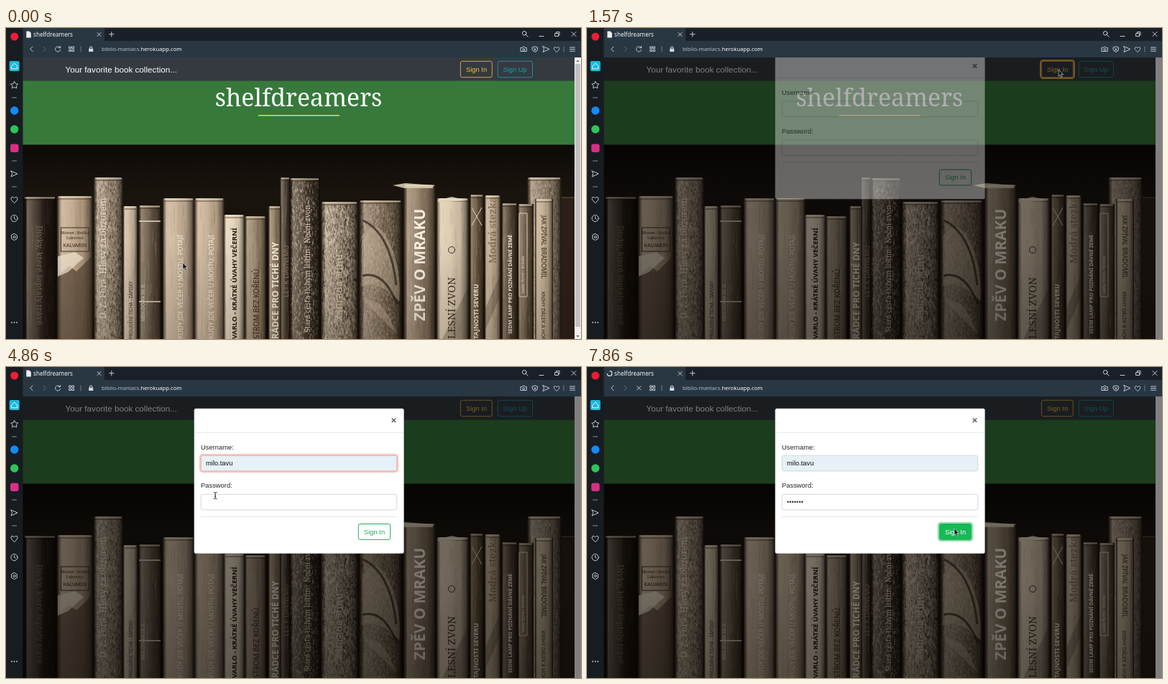
These frames come from a looping animation (800 px wide and 433 px high, 8000 ms). An HTML page:

```html
<!DOCTYPE html>
<html lang="en">
<head>
<meta charset="utf-8">
<title>Book collection</title>
<style>
html, body { margin: 0; width: 100%; height: 100%; overflow: hidden; background: #1a2026; }
svg { display: block; width: 100vw; height: 100vh; }
text { white-space: pre; }
.page { font: 9.37px "Liberation Sans", Arial, sans-serif; }
.ui { font-family: "Noto Sans", "Open Sans", sans-serif; }
.serif { font-family: "Noto Serif", serif; }
.icon { fill: none; stroke: #c3cbd1; stroke-width: 1; stroke-linecap: round; stroke-linejoin: round; }
</style>
</head>
<body>
<svg id="stage" viewBox="0 0 800 433" preserveAspectRatio="none">
  <defs>
    <linearGradient id="spine">
      <stop offset="0" stop-color="#0d0804" stop-opacity=".9"/>
      <stop offset=".07" stop-color="#0d0804" stop-opacity=".2"/>
      <stop offset=".12" stop-color="#fff0d8" stop-opacity=".36"/>
      <stop offset=".45" stop-color="#fff0d8" stop-opacity=".16"/>
      <stop offset=".72" stop-color="#0d0804" stop-opacity=".06"/>
      <stop offset=".9" stop-color="#0d0804" stop-opacity=".42"/>
      <stop offset="1" stop-color="#0d0804" stop-opacity=".92"/>
    </linearGradient>
    <linearGradient id="fall" x2="0" y2="1">
      <stop offset=".5" stop-color="#140d07" stop-opacity="0"/>
      <stop offset="1" stop-color="#140d07" stop-opacity=".2"/>
    </linearGradient>
    <linearGradient id="wall" x2="0" y2="1">
      <stop offset="0" stop-color="#0c0906"/>
      <stop offset=".25" stop-color="#1a140e"/>
      <stop offset="1" stop-color="#0c0805"/>
    </linearGradient>
    <clipPath id="photoClip"><rect x="23" y="162.6" width="768" height="271"/></clipPath>
    <filter id="shadow" x="-20%" y="-20%" width="140%" height="150%">
      <feDropShadow dx="0" dy="1" stdDeviation="1.2" flood-opacity=".4"/>
    </filter>
  </defs>

  <g class="page">
    <rect x="23" y="41" width="777" height="392" fill="#fff"/>
    <rect x="23" y="41" width="768" height="33" fill="#343a40"/>
    <rect x="23" y="73.6" width="768" height="90" fill="#37793b"/>
    <text x="82.5" y="61.5" font-size="11.7" fill="#fff">Your favorite book collection...</text>
    <rect id="navRing" x="631" y="45" width="47" height="25" rx="3.5" fill="none" stroke="#ffbf45" stroke-width="2" opacity=".85"/>
    <rect id="navBtn" x="632.3" y="46.3" width="44" height="22.4" rx="2.5" stroke="#f8bf3d" stroke-width=".8"/>
    <text id="navLabel" x="640" y="60.6">Sign In</text>
    <rect x="684.3" y="46.3" width="48.2" height="22.4" rx="2.5" fill="none" stroke="#17a2b8" stroke-width=".8"/>
    <text x="691.5" y="60.6" fill="#17a2b8">Sign Up</text>
    <text class="serif" x="407" y="109" font-size="33.8" fill="#fff" text-anchor="middle">shelfdreamers</text>
    <path d="M351 121.7h113" stroke="#f0d264" stroke-width="1.6"/>
    <g id="photo" clip-path="url(#photoClip)"></g>
    <g id="scroll">
      <rect x="791" y="41" width="9" height="392" fill="#f1f1f1"/>
      <rect x="792" y="50" width="7" height="366" fill="#c1c1c1"/>
      <path d="M793.5 47l2-2.5 2 2.5zM793.5 428l2 2.5 2-2.5z" fill="#606060"/>
    </g>
    <rect id="dim" x="23" y="41" width="777" height="392" fill="#000"/>

    <g id="modal">
      <rect x="261.7" y="57.7" width="292" height="202" rx="2.5" fill="#fff" stroke="#000" stroke-opacity=".25" stroke-width=".6"/>
      <path d="M262 91.2h291M271 208.5h273" stroke="#dfe3e7" stroke-width=".8"/>
      <path d="M536.8 71.5l5.4 5.4m0-5.4l-5.4 5.4" stroke="#6b6b6b" stroke-width="1.7"/>
      <text x="271" y="114.8" fill="#212529">Username:</text>
      <text x="271" y="168.4" fill="#212529">Password:</text>
      <g id="fields"></g>
      <rect id="sendRing" x="488.7" y="216.8" width="47.6" height="25" rx="3.5" fill="none" stroke="#9be0b1" stroke-width="2.2"/>
      <rect id="sendBtn" x="490.3" y="218.5" width="44.4" height="21.8" rx="2.5" stroke="#1cae58"/>
      <text id="sendLabel" x="498" y="232.6">Sign In</text>
      <g id="list" class="ui" font-size="8.6" font-weight="bold" fill="#1c1c1c">
        <rect x="270.5" y="146" width="112.5" height="72.5" rx="1.5" fill="#fff" stroke="#bbb" stroke-width=".6" filter="url(#shadow)"/>
        <rect id="hover" x="271" y="150" width="111.5" height="21.3" fill="#cfdfe4"/>
        <text x="277.5" y="164">milo.tavu</text>
        <text x="277.5" y="185">toma.bellix</text>
        <text x="277.5" y="206">milotavu</text>
      </g>
    </g>
  </g>

  <g id="chrome" class="ui">
    <rect width="800" height="18" fill="#1a2027"/>
    <rect width="23.5" height="433" fill="#171c21"/>
    <path d="M23.5 41V0H137v18h663v23z" fill="#293743"/>
    <text x="38" y="11.9" font-size="8.1" fill="#f2f4f5">shelfdreamers</text>
    <path class="icon" d="M127 6.5l5 5m0-5l-5 5M143.5 8.7h6.5m-3.2-3.2v6.5M742 11.5h6M787 5.5l6 6m0-6l-6 6M764 7.5h4.5v4h-4.5zM765.5 7V5.5h4.5v4.5h-1M723.3 9.3l3 3"/>
    <circle class="icon" cx="721.2" cy="7.2" r="2.8"/>
    <path id="tabDoc" d="M28.3 4.5h4l2.5 2.5v6.5h-6.5z" fill="#eef1f2"/>
    <path id="spinner" d="M31.5 5.7a3.3 3.3 0 1 1-3.3 3.3" fill="none" stroke="#dfe5e9" stroke-width="1.2"/>
    <path class="icon" d="M37 26l-3.3 3.3 3.3 3.3"/>
    <path class="icon" d="M52 26l3.3 3.3-3.3 3.3" opacity=".35"/>
    <path id="reload" class="icon" d="M75 27.2a3.6 3.6 0 1 0 .7 3.2M75.6 25.4v2.3h-2.3"/>
    <path id="stop" class="icon" d="M69.7 26.7l5.2 5.2m0-5.2l-5.2 5.2"/>
    <path class="icon" d="M88 26h2.4v2.4H88zM92.2 26h2.4v2.4h-2.4zM88 30.2h2.4v2.4H88zM92.2 30.2h2.4v2.4h-2.4z"/>
    <path d="M104 25.5v8M776 25.5v8" stroke="#6f7b84"/>
    <path d="M115.2 28.7h6v4.3h-6zM116 29v-1.4a2.2 2.2 0 0 1 4.4 0V29h-1v-1.3a1.2 1.2 0 0 0-2.4 0V29z" fill="#d2d8dc"/>
    <text x="133" y="32.2" font-size="7.7" fill="#b4bec6">biblio-maniacs.<tspan fill="#fff">herokuapp.com</tspan></text>
    <path class="icon" d="M716.3 27.5h2l1-1.3h2l1 1.3h2v5h-8zM732.3 27l3.6-1.2 3.6 1.2v3q-.6 2.5-3.6 3.4-3-.9-3.6-3.4zM734.5 28.5l2.8 2.8m0-2.8l-2.8 2.8M784.5 27h7m-7 2.6h7m-7 2.6h7"/>
    <circle class="icon" cx="720.3" cy="30" r="1.4"/>
    <g id="side"></g>
  </g>

  <g id="cursor">
    <path id="arrow" d="M0 0v9.2l2.1-2 1.5 3.4 1.6-.7-1.5-3.3h3z" fill="#111" stroke="#eee" stroke-width=".6"/>
    <path id="hand" d="M-1.6-3.8q1-1.2 1.7 0v3l4 .8q.9.4.7 1.6l-.7 4.4H-.7L-4 2q.6-1.4 2.4 0z" fill="#111" stroke="#eee" stroke-width=".6"/>
    <path id="beam" d="M-2.2-4.6q2 0 2.2 1 .2-1 2.2-1M-2.2 4.6q2 0 2.2-1 .2 1 2.2 1M0-3.6v7.2M-1 1h2" fill="none" stroke="#222"/>
  </g>
</svg>
<script>
const $ = id => document.getElementById(id);
const show = (id, on) => $(id).style.display = on ? '' : 'none';
const set = (id, attrs) => { for (const k in attrs) $(id).setAttribute(k, attrs[k]); };
const clamp = (v, lo = 0, hi = 1) => Math.min(hi, Math.max(lo, v));

let seed = 11;
const rand = () => (seed = seed * 16807 % 2147483647) / 2147483647;

// left, right, top, colour, grain strength
const books = `24 70 235 #1d150f .1
71 121 234 #b79f84 .12
122 163 208 #8d7d6a .6
163 183 248 #c6b39b .12
184 216 247 #594a3b .2
725 773 208 #847461 .4
383 396 258 #51402f .2
381 396 208 #3b3026 .2
218 262 237 #c2ac92 .15
262 304 237 #bda78d .15
303 332 260 #e2d2ba .12
332 362 262 #8d7a64 .2
365 383 248 #84705a .2
394 437 209 #3c3026 .6
438 490 242 #8a7a68 .75
491 551 240 #75634f .4
553 598 218 #85725c .2
599 644 237 #d8c6ac .12
645 665 232 #54432f .2
666 688 233 #b6a187 .2
689 712 244 #46382a .2
712 734 245 #5c4b39 .2
736 761 238 #b9a58b .12`.split('\n').map(r => r.split(' '));

// x, y where reading starts, direction, size, colour, font, title
const titles = `43|275|90|11.5|#75634f|serif|Dívky, které šeptaly trávě
139|405|-90|12.5|#e6d9c2|serif|D. Z. Fora  Hlasy za obzorem
176|433|-90|6.2|#3a2e23|ui|PROUDĚNÍ TICHA - ZÁPISKY
193|408|-90|6.2|#e8dcc6|ui|MEN-DO-RA SV. II.
246|433|-90|9|#f8efde|ui|KUDY JDE VEČER U MOSTU, POTAJÍ
289|433|-90|9|#f8efde|ui|KUDY JDE VEČER U MOSTU, POTAJÍ
321|433|-90|9.6|#241a12|bold|VARLO - KRÁTKÉ ÚVAHY VEČERNÍ
352|433|-90|10|#3a2c1f|ui|STROM BEZ KOŘENŮ
379|433|-90|12|#f6ecd9|bold|RÁDCE PRO TICHÉ DNY
393|375|-90|9.5|#8f7d66|ui|LET K DÁVNÉMU
423|424|-90|10|#e6d9c2|serif|Stará cesta tichým listím   Noční zvon
468|408|-90|14|#c9bba5|serif|Zahrada stínů
583|408|-90|21|#f8efde|bold|ZPĚV O MRAKU
625|433|-90|14.5|#40342a|serif|LESNÍ ZVON
657|433|-90|8.8|#f8efde|bold|TAJNOSTI SEVERU
682|328|-90|14.5|#7a664f|serif|Modrá stezka
704|426|-90|7|#f8efde|bold|SEDM LAMP PRO POZNÁNÍ DÁVNÉ ZEMĚ
721|370|-90|5.5|#e8dcc6|ui|Sedlo Tomil / Brázda
745|261|90|8.4|#33281d|ui|JAK ZPÍVAL BRADOMIL
745|367|90|7|#33281d|ui|KNIHY DÁLEK A HOR`.split('\n').map(r => r.split('|'));

// Fine grain: rough covers get many short flecks, smooth ones a few long scratches
function flecks(x, y, w, rough) {
  const count = rough ? w * 16 : w, len = rough ? 4 : 40;
  let d = '';
  for (let i = 0; i < count; i++)
    d += `M${(x + 2 + rand() * (w - 4)).toFixed(1)} ${(y + 3 + rand() * (430 - y)).toFixed(1)}v${(1 + rand() * len).toFixed(1)}`;
  return d;
}

function buildPhoto() {
  let out = `<rect x="23" y="162" width="768" height="271" fill="url(#wall)"/>
    <path d="M773 236h18v197h-18z" fill="#2b2017"/><path d="M773 236h18" stroke="#6d5b47"/>`;
  for (const [l, r, top, color, grain] of books) {
    const x = +l, w = r - l, y = +top, rough = grain >= .4;
    const box = `x="${x}" y="${y}" width="${w}" height="${433 - y}"`;
    out += `<rect ${box} rx="1.5" fill="${color}"/>
      <g stroke-width=".8" opacity="${grain}"><path d="${flecks(x, y, w, rough)}" stroke="#1d130a"/>
      <path d="${flecks(x, y, w, rough)}" stroke="#e3d3ba"/></g>
      <rect ${box} fill="url(#spine)"/>
      <path d="M${x + 2} ${y + 1.5}h${w - 4}" stroke="#eadcc4" stroke-width="2" opacity=".6"/>
      <path d="M${x + 2} ${y + 4}h${w - 4}" stroke="#1d130a" stroke-width="1.5" opacity=".4"/>`;
  }
  out += `<path d="M72 345l16-14 10 8 22-22v116H72z" fill="#3a2a1c" opacity=".55"/>
    <path d="M72 318l24-6 12 8-22 20-14 6z" fill="#f3e6d0" opacity=".75"/>
    <path d="M185 269h30M185 381h30" stroke="#e8dcc6" stroke-width="1.6"/>
    <path d="M495 290q20-30 38 8t14 82q-30-30-52-20zM498 380q25-10 45 45" fill="#c6b59c" opacity=".45"/>
    <path d="M497 268q38 18 46 90M496 345q30-8 48 40" fill="none" stroke="#2b1f14" stroke-width="3" opacity=".7"/>
    <path d="M600 240l20-5 22 5-40 3zM538 219l18-3 38 3v4h-40z" fill="#eadcc4" opacity=".8"/>
    <path d="M648 250l14 25m0-25l-14 25M714 258h11v116h-11z" fill="none" stroke="#e0d2ba"/>
    <path d="M607 433l36-72v72zM667 390l20-45v30l-20 45z" fill="#2b1f14" opacity=".25"/>
    <g fill="none" stroke="#3d3023"><rect x="76.5" y="278" width="39" height="33"/><circle cx="620" cy="309" r="4.5"/></g>
    <g fill="#33281d" text-anchor="middle" class="serif"><text x="96" y="287" font-size="5.2">Mornet / Bralka</text>
    <text x="96" y="294" font-size="5.2">Lukorová</text><text x="96" y="305" font-size="7" class="ui">KALVARIN</text></g>`;
  for (const [x, y, turn, size, color, font, name] of titles)
    out += `<text class="${font === 'serif' ? 'serif' : 'ui'}" font-weight="${font === 'bold' ? 700 : 400}" transform="translate(${x} ${y}) rotate(${turn})" font-size="${size}" fill="${color}">${name}</text>`;
  $('photo').innerHTML = out + '<rect x="23" y="162" width="768" height="271" fill="url(#fall)"/>';
}

function buildSide() {
  const plane = (x, y) => `<path class="icon" d="M${x - 4} ${y - 4}l9 4-9 4 1.5-4z"/>`;
  const heart = (x, y, s) => `<path class="icon" transform="translate(${x} ${y}) scale(${s})" d="M0 4.5L-4 .5Q-5.5-2-3.5-3.5-1.5-4.5 0-2 1.5-4.5 3.5-3.5 5.5-2 4 .5z"/>`;
  const dot = (x, y, r, c) => `<circle cx="${x}" cy="${y}" r="${r}" fill="${c}"/>`;
  $('side').innerHTML = dot(11.7, 12, 5.5, '#ee1c35') +
    '<rect x="4.7" y="46" width="14" height="14" rx="2" fill="#20b7dc"/>' +
    '<path class="icon" d="M7.8 53l4-3.8 4 3.8v3.8h-8z" style="stroke:#e9fbff"/>' +
    '<path class="icon" d="M11.7 74.5l1.7 3 3.3.6-2.3 2.5.4 3.2-3.1-1.3-3.1 1.3.4-3.2-2.3-2.5 3.3-.6z"/>' +
    dot(11.7, 115, 5.7, '#1689f5') + dot(11.7, 141, 5.7, '#2fc45a') +
    '<rect x="6" y="161.5" width="11.5" height="11.5" rx="3" fill="#d72f86"/>' +
    '<path class="icon" d="M8.5 97h6M8.5 185h6M8.5 221h6" opacity=".65"/>' +
    plane(11, 203) + heart(11.5, 239, 1) + plane(751, 29.5) + heart(766, 29.7, .85) +
    '<circle class="icon" cx="11.5" cy="265" r="4.6"/><path class="icon" d="M11.5 262.5v2.7l1.8 1.3"/>' +
    '<path class="icon" d="M11.5 286.5l3.9 2.2v4.6l-3.9 2.2-3.9-2.2v-4.6z"/><circle class="icon" cx="11.5" cy="291" r="1.5"/>' +
    [8, 11.5, 15].map(x => dot(x, 410, .9, '#c3cbd1')).join('');
}

function field(y, focus, filled) {
  const ring = focus ? `<rect x="270" y="${y - 1}" width="275" height="24" rx="3.5" fill="none" stroke="#f9cbc3" stroke-width="2.4"/>` : '';
  return ring + `<rect x="271.3" y="${y + .3}" width="272.5" height="21.6" rx="2.5" fill="${filled ? '#e6f1f8' : '#fff'}" stroke="${focus ? '#efa195' : '#ced4da'}" stroke-width=".9"/>`;
}

// step, x, y of the pointer
const path = [[0, 246, 327], [5, 669, 50], [8, 656, 58], [12, 656, 58], [17, 372, 142],
  [21, 305, 135], [24, 305, 135], [27, 292, 152], [31, 292, 152], [35, 291, 184],
  [47, 291, 184], [52, 511, 225], [56, 511, 225]];

function pointer(n) {
  const i = Math.max(1, path.findIndex(p => p[0] >= n));
  const [a, x0, y0] = path[i - 1], [b, x1, y1] = path[i];
  const k = clamp((n - a) / (b - a)), e = k * k * (3 - 2 * k);
  return [x0 + (x1 - x0) * e, y0 + (y1 - y0) * e];
}

function drawFields(n) {
  const user = n >= 26, picked = n >= 30, first = n >= 21 && n < 35, second = n >= 35 && n < 53;
  const typed = clamp(n - 39, 0, 7);
  let out = field(123, first, user) + field(177, second, false);
  if (user) out += picked
    ? '<text x="278" y="137.3" fill="#111">milo.tavu</text>'
    : '<text class="ui" x="278.5" y="136.8" font-size="7.6" fill="#222">milo.tavu</text>';
  out += `<text x="278" y="191.3" fill="#333">${'•'.repeat(typed)}</text>`;
  const busy = typed > 0 && typed < 7;
  if ((first || second) && (busy || n % 7 < 4 || !picked)) {
    const x = second ? 278.5 + typed * 3.28 : picked ? 315.5 : 278.5;
    out += `<path d="M${x} ${second ? 183 : 129}v10" stroke="#222" stroke-width=".7"/>`;
  }
  $('fields').innerHTML = out;
}

function draw(n) {
  const hot = n >= 5 && n < 10, loading = n >= 54, sendHot = n >= 52;
  const life = Math.max(0, n - 10.6) / 7; // seconds since the dialog opened
  set('navBtn', { fill: hot ? '#f8bf3d' : 'none' });
  set('navLabel', { fill: hot ? '#212529' : '#f8bf3d' });
  show('navRing', n >= 9 && n < 12);
  show('scroll', n < 10);
  set('dim', { opacity: .5 * clamp((n - 9.6) / 7 / .15) });
  show('modal', n >= 11);
  set('modal', {
    opacity: clamp(life / .15),
    transform: `translate(0 ${-29.3 * (1 - clamp(life / .3)) ** 1.5})`
  });
  drawFields(n);
  show('list', n >= 23 && n < 30);
  show('hover', n >= 26);
  show('sendRing', n >= 53);
  set('sendBtn', { fill: sendHot ? '#17b956' : '#fff' });
  set('sendLabel', { fill: sendHot ? '#fff' : '#1cae58' });
  show('tabDoc', !loading);
  show('reload', !loading);
  show('spinner', loading);
  show('stop', loading);
  set('spinner', { transform: `rotate(${(n - 55) * 70} 31.5 9)` });

  const [x, y] = pointer(n);
  const beam = (n >= 16 && n < 26) || (n >= 34 && n < 49);
  set('cursor', { transform: `translate(${x.toFixed(1)} ${y.toFixed(1)})` });
  show('arrow', !beam && !hot);
  show('hand', hot);
  show('beam', beam);
}

buildPhoto();
buildSide();
let last = -1;
const start = performance.now();
function tick() {
  const t = (performance.now() - start) % 8000;
  const n = Math.floor((t + 4) * 7 / 1000) % 56; // seven steps a second
  if (n !== last) draw(last = n);
  requestAnimationFrame(tick);
}
tick();
</script>
</body>
</html>
```
